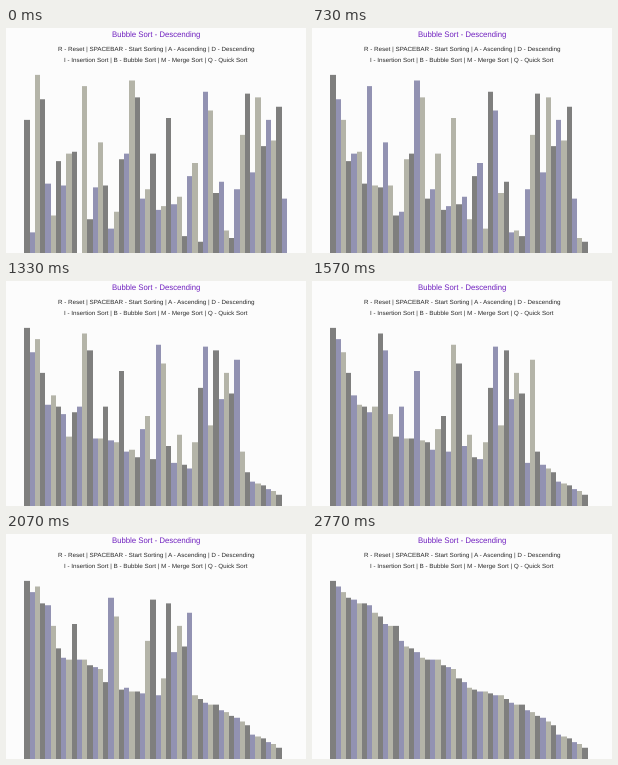
A matplotlib script for the animation above (2830 ms loop, 300x225 px).

```python
import math

import matplotlib.pyplot as plt
from matplotlib.animation import FuncAnimation

W, H = 300, 225
TICK, LOOP = 10, 2830          # ms
START_STEP, LEAD_STEP = 7, 3   # first visible step, step where sorting began
SWAPS_PER_STEP = 8

SIDE, BAR_W, UNIT = 18.75, 5.25, 1.875
SHADES = ["#7f7f7e", "#9292b2", "#b4b4a8"]

VALUES = [
    71, 11, 95, 82, 37, 20, 49, 36, 53, 54,
    0, 89, 18, 35, 59, 36, 13, 22, 50, 53,
    92, 83, 29, 34, 53, 23, 25, 72, 26, 30,
    9, 41, 48, 6, 86, 76, 32, 38, 12, 8,
    34, 63, 85, 43, 83, 57, 71, 60, 78, 29,
]


def bubble_sort(values):
    """Return the list after every swap of a descending bubble sort."""
    a = list(values)
    states = [a[:]]
    for end in range(len(a) - 1, 0, -1):
        for j in range(end):
            if a[j] < a[j + 1]:
                a[j], a[j + 1] = a[j + 1], a[j]
                states.append(a[:])
    return states


STATES = bubble_sort(VALUES)

plt.rcParams["text.hinting"] = "none"
plt.rcParams["font.family"] = "Liberation Sans"

fig = plt.figure(figsize=(W / 72, H / 72), dpi=72, facecolor="#fcfcfc")
ax = fig.add_axes([0, 0, 1, 1])
ax.set_xlim(0, W)
ax.set_ylim(0, H)
ax.axis("off")


def label(text, baseline, size, color):
    ax.text(W / 2, H - baseline, text, fontsize=size, color=color,
            ha="center", va="baseline")


label("Bubble Sort - Descending", 9.7, 7.72, "#7020c0")
label("R - Reset | SPACEBAR - Start Sorting | A - Ascending | D - Descending",
      23.2, 6.2, "#282828")
label("I - Insertion Sort | B - Bubble Sort | M - Merge Sort | Q - Quick Sort",
      34.2, 6.26, "#282828")

edges = [math.floor(SIDE + BAR_W * i) for i in range(len(VALUES) + 1)]
bars = ax.bar(
    edges[:-1],
    [v * UNIT for v in VALUES],
    width=[b - a for a, b in zip(edges, edges[1:])],
    align="edge",
    color=[SHADES[i % 3] for i in range(len(VALUES))],
    linewidth=0,
)
for bar in bars:
    bar.set_snap(False)
ax.set_xlim(0, W)
ax.set_ylim(0, H)


def update(tick):
    step = (3 * tick + 1) // 10   # 30 steps per second, rounded to ticks
    swaps = 0 if step < START_STEP else SWAPS_PER_STEP * (step - LEAD_STEP)
    state = STATES[min(swaps, len(STATES) - 1)]
    for bar, value in zip(bars, state):
        bar.set_height(value * UNIT)
    return list(bars)


anim = FuncAnimation(fig, update, frames=LOOP // TICK, interval=TICK,
                     repeat=True, repeat_delay=0, blit=False)
plt.show()
```
